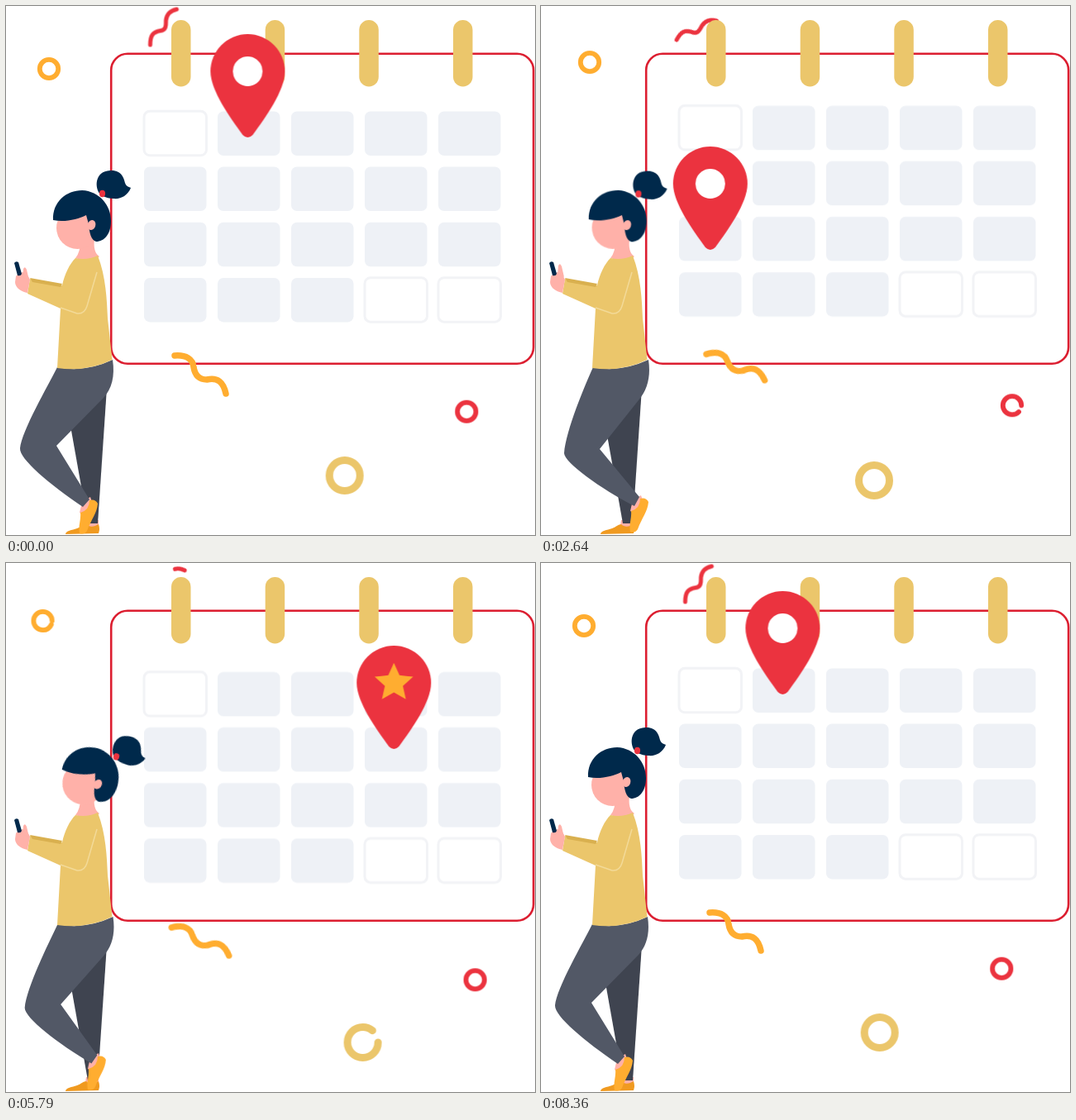
These frames come from a looping animation (640x640 px, 8430 ms). An HTML page without scripts:

```html
<!DOCTYPE html>
<html lang="en">
<head>
<meta charset="utf-8">
<title>Calendar</title>
<style>
html, body { margin: 0; width: 100%; height: 100%; overflow: hidden; background: #fff; }
svg { display: block; width: 100vw; height: 100vh; }

.navy { fill: #00294b; }
.skin { fill: #ffb1a9; }
.gold { fill: #ebc66b; }
.red { fill: #eb333f; }
.line { fill: none; stroke-linecap: round; stroke-dasharray: 1 1.2; }
#cell { fill: #eef1f6; }
#blank { fill: #fff; stroke: #f2f3f6; stroke-width: 3; }

.grid, .pinx, .piny, .badge, .head, .leg, .foot, .thumb, .line {
  animation: 8.43s linear infinite;
}
.grid { animation-name: grid; }
.pinx { animation-name: pinx; }
.piny { animation-name: piny; }
.badge { animation-name: badge; }
.head { animation-name: head; transform-origin: 97px 295px; }
.leg { animation-name: leg; animation-timing-function: ease-in-out; }
.foot { animation-name: foot; animation-timing-function: ease-in-out; }
.thumb { animation-name: thumb; }

/* each line drifts and is also wiped away and redrawn once per loop */
.wave1 { animation-name: wave1, wipe; animation-delay: 0s, -8.39s; }
.wave2 { animation-name: wave2, flick; animation-delay: 0s, -3.372s; }
.ring1 { animation-name: ring1, wipe; animation-delay: 0s, -2.71s; }
.ring2 { animation-name: ring2, wipe; animation-delay: 0s, -5.92s; }
.ring3 { animation-name: ring3, flick; animation-delay: 0s, -4.46s; }

@keyframes wipe {
  0% { stroke-dashoffset: 0; }
  14%, 16% { stroke-dashoffset: -1.1; }
  30%, 100% { stroke-dashoffset: -2.2; }
}
@keyframes flick {
  0% { stroke-dashoffset: 0; }
  12% { stroke-dashoffset: -1.1; }
  23%, 100% { stroke-dashoffset: -2.2; }
}
@keyframes grid {
  0%, 99.2%, 100% { transform: translateY(0); }
  12.7% { transform: translateY(-1.7px); }
  31.3% { transform: translateY(-6.8px); }
  39% { transform: translateY(-8.4px); }
  44% { transform: translateY(-8.1px); }
  68.7% { transform: translateY(4.4px); }
  76% { transform: translateY(6px); }
  83.9% { transform: translateY(4.8px); }
}
@keyframes pinx {
  0% { transform: translateX(292.4px); animation-timing-function: cubic-bezier(.33, .6, .67, .4); }
  12.7% { transform: translateX(285px); animation-timing-function: cubic-bezier(.33, .08, .67, 1); }
  31.3% { transform: translateX(204.8px); animation-timing-function: cubic-bezier(.33, 0, .67, .88); }
  44% { transform: translateX(386.5px); animation-timing-function: cubic-bezier(.33, .54, .67, 1); }
  68.7% { transform: translateX(469.3px); animation-timing-function: cubic-bezier(.33, 0, .67, .66); }
  83.9% { transform: translateX(385.8px); animation-timing-function: cubic-bezier(.33, .32, .67, .95); }
  99.2%, 100% { transform: translateX(292.4px); }
}
@keyframes piny {
  0% { transform: translateY(159px); animation-timing-function: cubic-bezier(.33, 0, .67, .76); }
  12.7% { transform: translateY(233px); animation-timing-function: cubic-bezier(.33, .42, .67, 1); }
  31.3% { transform: translateY(295px); animation-timing-function: cubic-bezier(.33, 0, .67, .42); }
  44% { transform: translateY(291px); animation-timing-function: cubic-bezier(.33, .07, .67, .6); }
  68.7% { transform: translateY(225px); animation-timing-function: cubic-bezier(.33, .26, .67, .96); }
  83.9% { transform: translateY(163px); animation-timing-function: cubic-bezier(.33, .6, .67, 1); }
  99.2%, 100% { transform: translateY(159px); }
}
@keyframes badge {
  0%, 54%, 85%, 100% {
    fill: #fff;
    d: path("M0-18Q5.8-18 10.6-14.6Q15.3-11.1 17.1-5.6Q18.9 0 17.1 5.6Q15.3 11.1 10.6 14.6Q5.8 18 0 18Q-5.8 18-10.6 14.6Q-15.3 11.1-17.1 5.6Q-18.9 0-17.1-5.6Q-15.3-11.1-10.6-14.6Q-5.8-18 0-18Z");
  }
  64%, 74% {
    fill: #ffad30;
    d: path("M0-24.3Q3.4-16.8 6.8-9.2Q15-8.3 23.3-7.5Q17.1-1.9 10.9 3.7Q12.7 11.7 14.5 19.8Q7.2 15.6 0 11.5Q-7.2 15.6-14.5 19.8Q-12.7 11.7-10.9 3.7Q-17.1-1.9-23.3-7.5Q-15-8.3-6.8-9.2Q-3.4-16.8 0-24.3Z");
  }
}
@keyframes head {
  0%, 28.5% { transform: none; animation-timing-function: ease-in-out; }
  42.7%, 74% { transform: rotate(15deg); animation-timing-function: ease-in-out; }
  94%, 100% { transform: none; }
}
@keyframes leg {
  0%, 12.7%, 25.2%, 37.7%, 50.3%, 92%, 100% {
    d: path("M62 437C51 459 19 514 17 535C16 548 52 578 93 606L101 597L61 532L118 474C128 463 132 448 129 428Q95 444 62 437Z");
  }
  19%, 31.3%, 44% {
    d: path("M63 437C53 459 30 514 28 541C28 552 72 584 113 605L119 594L71 536L118 477C129 464 133 448 130 428Q95 444 63 437Z");
  }
  56.7% {
    d: path("M63 437C53 459 30 514 28 541C28 552 72 584 113 605L119 594L71 536L118 477C129 464 133 448 130 428Q95 444 63 437Z");
    animation-timing-function: cubic-bezier(.25, .35, .6, .95);
  }
}
@keyframes foot {
  0%, 12.7%, 25.2%, 37.7%, 50.3%, 92%, 100% { transform: none; }
  19%, 31.3%, 44% { transform: translate(19px, -2px); }
  56.7% { transform: translate(19px, -2px); animation-timing-function: cubic-bezier(.25, .35, .6, .95); }
}
@keyframes thumb {
  0%, 12.7%, 22%, 42%, 100% { transform: none; }
  6%, 18%, 31.3% { transform: translateY(-4px); }
}
@keyframes wave1 {
  0%, 99.2%, 100% { transform: translate(235px, 446px); }
  12.7% { transform: translate(234.5px, 442px) rotate(-5deg); }
  31.3% { transform: translate(235.3px, 437px) rotate(-12.5deg); }
  44% { transform: translate(235px, 445px) rotate(-17deg); }
  68.7% { transform: translate(235px, 458px) rotate(-10.5deg); }
  83.9% { transform: translate(235px, 452px) rotate(-3.5deg); }
}
@keyframes wave2 {
  0%, 99.2%, 100% { transform: translate(190.5px, 25.5px); }
  12.7% { transform: translate(190.5px, 29.5px) rotate(10deg); }
  31.3% { transform: translate(188.3px, 29.5px) rotate(28deg); }
  44% { transform: translate(189.5px, 24.5px) rotate(43deg); }
  68.7% { transform: translate(190.5px, 16.5px) rotate(37deg); }
  83.9% { transform: translate(190.5px, 22px) rotate(12deg); }
}
@keyframes ring1 {
  0%, 99.2%, 100% { transform: translate(52px, 76px); }
  12.7% { transform: translate(55px, 72.5px); }
  31.3% { transform: translate(59px, 68px); }
  44% { transform: translate(53.8px, 68.8px); }
  68.7% { transform: translate(44.5px, 70px); }
  83.9% { transform: translate(48px, 73px); }
}
@keyframes ring2 {
  0%, 99.2%, 100% { transform: translate(557.3px, 490.7px); }
  12.7% { transform: translate(562.6px, 487.5px); }
  31.3% { transform: translate(570px, 483.2px); }
  50% { transform: translate(570px, 493px); }
  68.7% { transform: translate(567.6px, 504.3px); }
  83.9% { transform: translate(562px, 497px); }
}
@keyframes ring3 {
  0%, 99.2%, 100% { transform: translate(409.7px, 568px); }
  12.7% { transform: translate(406.7px, 570.7px); }
  31.3% { transform: translate(403px, 574px); }
  44% { transform: translate(413px, 576.8px); }
  68.7% { transform: translate(431.6px, 580px); }
  83.9% { transform: translate(420px, 573.5px); }
}
</style>
</head>
<body>
<svg viewBox="0 0 640 640">
  <defs>
    <rect id="cell" x="167" y="127.5" width="75.5" height="53.5" rx="7"/>
    <rect id="blank" x="167" y="127.3" width="75.5" height="53.5" rx="7"/>
    <g id="row">
      <use href="#cell"/>
      <use href="#cell" x="89"/>
      <use href="#cell" x="178"/>
      <use href="#cell" x="267"/>
      <use href="#cell" x="356"/>
    </g>
    <rect id="tab" class="gold" x="200" y="17" width="23.5" height="80.5" rx="11.7"/>
  </defs>

  <!-- calendar -->
  <rect x="127.2" y="57.8" width="511" height="375" rx="20" fill="#fff" stroke="#dc1e30" stroke-width="2.6"/>
  <g class="grid">
    <use href="#blank"/>
    <use href="#cell" x="89"/>
    <use href="#cell" x="178"/>
    <use href="#cell" x="267"/>
    <use href="#cell" x="356"/>
    <use href="#row" y="67"/>
    <use href="#row" y="134.3"/>
    <g transform="translate(0 201.4)">
      <use href="#cell"/>
      <use href="#cell" x="89"/>
      <use href="#cell" x="178"/>
      <use href="#blank" x="267"/>
      <use href="#blank" x="356"/>
    </g>
  </g>
  <path class="line wave2" pathLength="1" stroke="#eb333f" stroke-width="5"
    d="M-16 21.5C-16 9-12 6-4 4.5C4 3.5 3-3 3-8C4-16 8-20 16-21.5"/>
  <use href="#tab"/>
  <use href="#tab" x="113.7"/>
  <use href="#tab" x="227.3"/>
  <use href="#tab" x="341"/>

  <!-- woman -->
  <path class="skin" d="M97 622H112V634H95Z"/>
  <path fill="#f09a20" d="M72 639C72 635 80 634 86 632C91 630 94 627 97 627C101 631 107 630 112 627Q114 633 112 638Z"/>
  <path fill="#3f4450" d="M122 462L111 626H99L78 508Z"/>
  <g class="foot">
    <path class="skin" d="M92 600L102 594L105 603L95 616L89 613Z"/>
    <path fill="#ffad30" d="M101 598Q108 596 111 602C110 614 103 621 98 635Q95 640 89 638C87 629 91 622 90 613Q101 610 101 598Z"/>
  </g>
  <path class="leg" fill="#525866" d="M62 437C51 459 19 514 17 535C16 548 52 578 93 606L101 597L61 532L118 474C128 463 132 448 129 428Q95 444 62 437Z"/>
  <path class="skin" d="M90 284L107 282Q105 298 113 303Q104 312 84 305Q90 298 90 284Z"/>
  <path class="gold" d="M84 305Q98 308 111 302C121 328 122 355 123 378L128.500 428Q98 443 62 438L66 366L26 348L29 330L68 338C71 324 77 312 84 305Z"/>
  <path fill="#d9b04f" d="M29 329L68 336L66 340L32 334Z"/>
  <path d="M110 322L98 363Q95 373 86 372L66 365" fill="none" stroke="#f3da98" stroke-width="1.500"/>
  <path class="skin" d="M12 327C15 323 17 325 19 322C23 322 27 326 29 331L26 347C19 346 11 341 11 334Z"/>
  <path class="navy" d="M10 311Q12 308 15 310L19 324Q18 327 14 326Z"/>
  <path class="skin thumb" d="M20 328L21 318Q23 314 25 319L28 332Z"/>

  <g class="head">
    <circle class="skin" cx="86.500" cy="268.500" r="25.500"/>
    <path class="navy" d="M57 259C56 237 73 223 92 223C113 224 127 241 127 260C127 276 119 285 109 285C103 283 101 275 100 264L97 253C87 258 71 262 57 259Z"/>
    <ellipse class="skin" cx="103.500" cy="265" rx="4.800" ry="6" transform="rotate(20 103.500 265)"/>
    <path class="navy" d="M114 228C107 220 107 200 126 199C140 198 143 209 144 214C145 218 149 219 151 220C147 230 138 234 130 233C123 233 117 230 114 228Z"/>
    <ellipse class="red" cx="116.500" cy="227" rx="3.600" ry="4.200"/>
  </g>

  <!-- confetti -->
  <path class="line wave1" pathLength="1" stroke="#ffad30" stroke-width="7.500"
    d="M-31-23C-17-24-9-19-8-9C-6 3 1 6 8 6C21 3 28 9 31 23"/>
  <circle class="line ring1" pathLength="1" r="11.200" stroke="#ffad30" stroke-width="5.800"/>
  <circle class="line ring2" pathLength="1" r="11.200" stroke="#eb333f" stroke-width="5.800"/>
  <circle class="line ring3" pathLength="1" r="18.500" stroke="#ebc66b" stroke-width="9"/>

  <!-- pin -->
  <g class="pinx">
    <g class="piny">
      <path class="red" d="M-45-80A45 45 0 0 1 45-80C45-57 22-25 6-3Q0 3-6-3C-22-25-45-57-45-80Z"/>
      <g transform="translate(0 -80)">
        <path class="badge" fill="#fff" d="M0-18A18 18 0 0 1 0 18A18 18 0 0 1 0-18Z"/>
      </g>
    </g>
  </g>
</svg>
</body>
</html>
```
